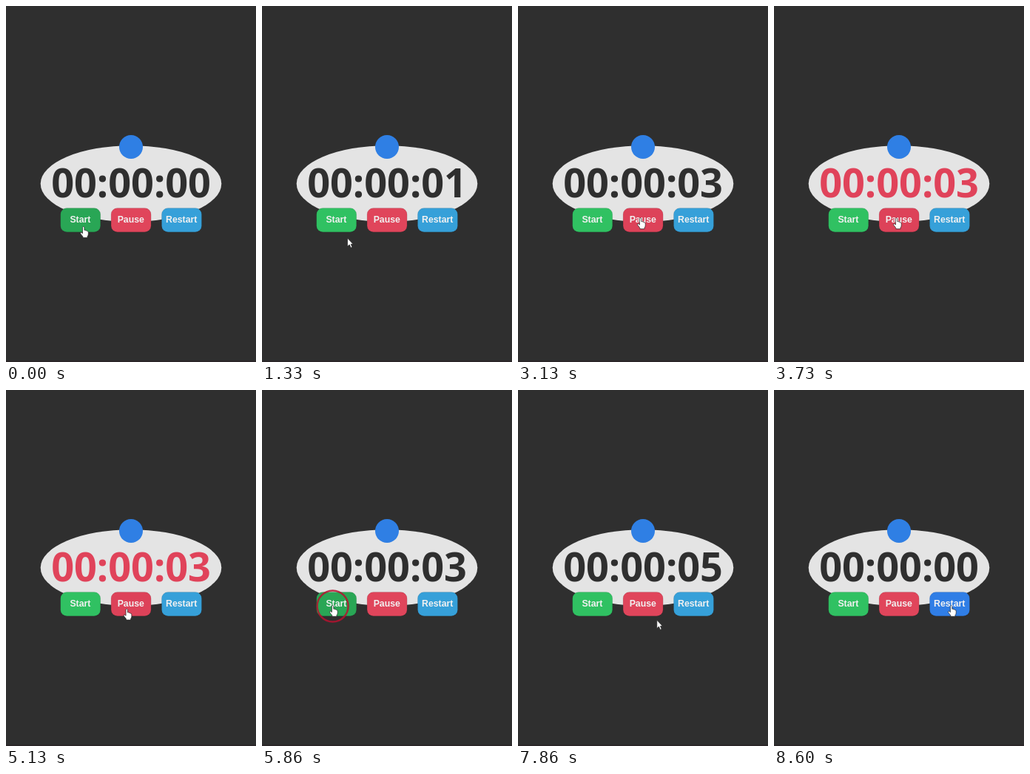
An HTML page that plays this animation: 338x480 px, repeating every 9060 ms.

```html
<!DOCTYPE html>
<html lang="en">
<head>
<meta charset="utf-8">
<title>Stopwatch</title>
<style>
html, body { margin: 0; width: 100%; height: 100%; overflow: hidden; background: #2f2f2f; }
svg { display: block; width: 100vw; height: 100vh; }
.time { font: 700 54px "Open Sans", "Noto Sans", sans-serif; }
.label { font: 700 12.3px "Liberation Sans", Arial, sans-serif; fill: #f1f1f1; text-anchor: middle; }
</style>
</head>
<body>
<svg viewBox="0 0 338 480">
  <rect width="338" height="480" fill="#2f2f2f"/>
  <rect y="478" width="338" height="2" fill="#2b2729"/>
  <ellipse cx="169" cy="239.6" rx="122.3" ry="51.4" fill="#e4e4e4"/>
  <circle cx="169" cy="190" r="16" fill="#2f7fe4"/>
  <text id="time" class="time" x="61.2" y="258.3"></text>
  <g id="buttons"></g>
  <circle id="ring" r="21" fill="none" stroke="#b5122f" stroke-width="2.4"/>
  <g id="cursor" stroke="#222" stroke-width=".7" stroke-linejoin="round" fill="#fff">
    <path id="arrow" d="M0 0V11.2L2.6 8.8L4.5 13L6.4 12.2L4.6 8.1H7.6Z"/>
    <path id="hand" transform="translate(0 -1.2)" d="M-1.2 1Q0 -.8 1.2 1V5Q2.6 4.2 3.3 5.6Q4.6 5 5.1 6.3Q6.6 6 6.6 7.8V10.5Q6.4 12.5 5.4 13.2V15H-.8V13.6L-4 9.6Q-4.6 8 -3 7.9L-1.2 9.3Z"/>
  </g>
</svg>
<script>
const LOOP = 9060;
const STEP = 1000 / 15;
const DARK = '#2f2f2f', RED = '#e0435a';
const BOX = { y: 272.5, width: 54, height: 32.3 };
const click = { start: 60, pause: 3460, resume: 5860, reset: 8330 };
const $ = id => document.getElementById(id);

const buttons = [
  { name: 'Start', fill: '#30c162', hover: '#29a655' },
  { name: 'Pause', fill: '#e0455b', hover: '#dd4259' },
  { name: 'Restart', fill: '#36a0d9', hover: '#307ee6' }
];

function make(tag, attrs, parent) {
  const el = document.createElementNS('http://www.w3.org/2000/svg', tag);
  for (const key in attrs) el.setAttribute(key, attrs[key]);
  return parent.appendChild(el);
}

buttons.forEach((b, i) => {
  b.x = 73.7 + 68.4 * i;
  b.rect = make('rect', { ...BOX, x: b.x, rx: 8.5,
    stroke: '#000', 'stroke-opacity': .12, 'stroke-width': .8 }, $('buttons'));
  make('text', { class: 'label', x: b.x + BOX.width / 2 - .3, y: 292 }, $('buttons')).textContent = b.name;
});

// Each move speeds up towards its end point; sag bends it downwards.
const home = { x: 104.7, y: 298.5 };
const moves = [
  { from: 200, to: 600, x: 113, y: 307, sag: 0 },
  { from: 1060, to: 1330, x: 115.6, y: 313, sag: 0 },
  { from: 2130, to: 3130, x: 165.6, y: 286.8, sag: 18 },
  { from: 5060, to: 5460, x: 95.6, y: 291.5, sag: 17 },
  { from: 6400, to: 7130, x: 149.5, y: 324, sag: 0 },
  { from: 7130, to: 8260, x: 239.6, y: 291.5, sag: 0 }
];

function pointerAt(t) {
  let { x, y } = home;
  for (const m of moves) {
    const k = Math.min(1, Math.max(0, (t - m.from) / (m.to - m.from)));
    x += (m.x - x) * k * k;
    y += (m.y - y) * k * k + m.sag * Math.sin(Math.PI * k);
  }
  return { x, y };
}

function secondsAt(t) {
  if (t >= click.reset) return 0;
  const whole = ms => Math.max(0, Math.floor(ms / 1000));
  return whole(Math.min(t, click.pause) - click.start) + whole(t - click.resume);
}

function render(ms) {
  const t = Math.floor((ms % LOOP + 6.7) / STEP) * STEP;
  const { x, y } = pointerAt(t);
  let over = false;
  for (const b of buttons) {
    const inside = x >= b.x && x <= b.x + BOX.width && y >= BOX.y && y <= BOX.y + BOX.height;
    b.rect.setAttribute('fill', inside ? b.hover : b.fill);
    over = over || inside;
  }
  $('cursor').setAttribute('transform', `translate(${x} ${y})`);
  $('arrow').style.display = over ? 'none' : '';
  $('hand').style.display = over ? '' : 'none';

  const age = Math.min(...Object.values(click).filter(c => c <= t).map(c => t - c));
  const ring = $('ring');
  ring.style.display = age < 2 * STEP ? '' : 'none';
  ring.setAttribute('cx', x);
  ring.setAttribute('cy', y);
  ring.setAttribute('opacity', age < STEP ? .85 : .5);

  const paused = t >= click.pause && t < click.resume;
  $('time').textContent = '00:00:0' + secondsAt(t);
  $('time').setAttribute('fill', paused ? RED : DARK);
}

const start = performance.now();
function tick() {
  render(performance.now() - start);
  requestAnimationFrame(tick);
}
tick();
</script>
</body>
</html>
```
